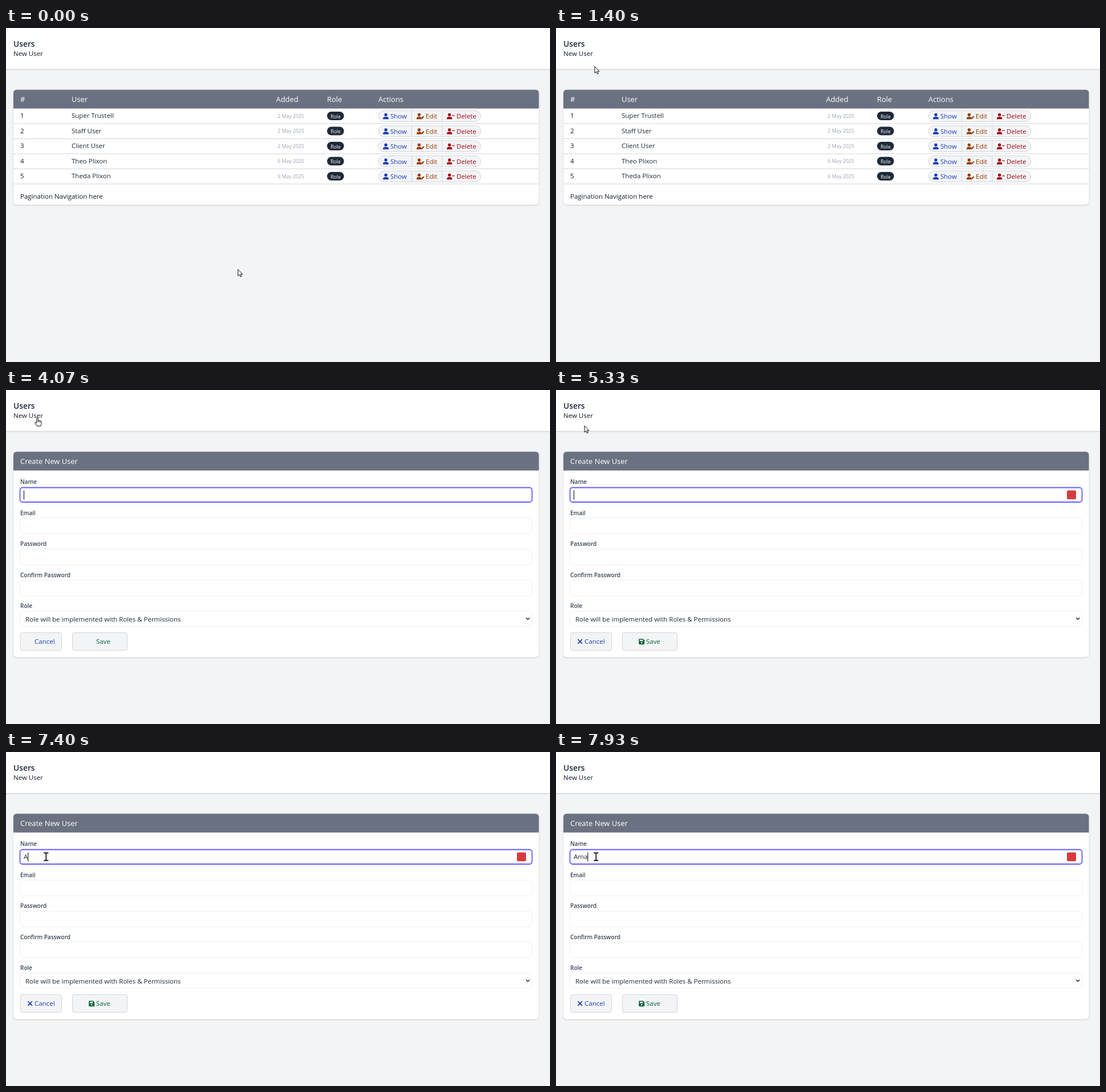
Animation, 954 px wide and 587 px high, one loop 8 s. Source, as an HTML page:

```html
<!DOCTYPE html>
<html lang="en">
<head>
<meta charset="utf-8">
<title>Users</title>
<style>
  html, body { margin: 0; width: 100%; height: 100%; overflow: hidden; background: #f3f4f6; }
  svg { display: block; width: 954px; height: 587px; }
  text { font-family: "Open Sans", "Noto Sans", sans-serif; white-space: pre; }
  .shadow { filter: drop-shadow(0 1px 1.5px rgba(0,0,0,.16)); }
  .field { filter: drop-shadow(0 .8px .8px rgba(0,0,0,.13)); }
  .float { filter: drop-shadow(0 1px 3px rgba(0,0,0,.3)); }
</style>
</head>
<body>
<svg id="stage" viewBox="0 0 954 587" xmlns="http://www.w3.org/2000/svg"></svg>
<script>
const LOOP = 8000, STEP = 1000 / 15;
const INK = '#1e2939', GREY = '#6a7282', LINE = '#d1d5dc', PALE = '#f3f4f6';
const BLUE = '#193cb8', AMBER = '#973c00', RED = '#9f0712', GREEN = '#016630';
const BODY = 11.5, HEAD = 12.9, SMALL = 8.7;

const text = (x, y, str, size = BODY, fill = INK, weight = 400, extra = '') =>
  `<text x="${x}" y="${y}" font-size="${size}" fill="${fill}" font-weight="${weight}" ${extra}>${str}</text>`;
const rect = (x, y, w, h, fill, extra = '') =>
  `<rect x="${x}" y="${y}" width="${w}" height="${h}" fill="${fill}" ${extra}/>`;
const path = (d, fill, extra = '') => `<path d="${d}" fill="${fill}" ${extra}/>`;
const group = (x, y, inner) => `<g transform="translate(${x} ${y})">${inner}</g>`;
const layer = (id, inner) => `<g id="${id}">${inner}</g>`;

const person = (x, y, fill, w = 10.2) => group(x, y,
  `<circle cx="${w / 2}" cy="2.7" r="2.7" fill="${fill}"/>` +
  path(`M0 10.6Q0 6.4 ${w * .4} 6.4H${w * .6}Q${w} 6.4 ${w} 10.6Z`, fill));

function card(height, title) {
  return rect(13, 108.5, 921.5, height, '#fff', 'rx="6" class="shadow"') +
    path('M13 141.5V114.5Q13 108.5 19 108.5H928.5Q934.5 108.5 934.5 114.5V141.5Z', GREY) + title;
}

function userRow([name, date], i) {
  const y = 141.5 + i * 26.5;
  const pen = path('M0 5.2L.5 3.2 4 -.3 5.7 1.4 2.2 4.8Z', AMBER);
  return text(25, y + 16.7, i + 1, BODY, '#101828') +
    text(115, y + 16.7, name) +
    text(476.5, y + 16, date, SMALL, '#99a1af') +
    rect(563, y + 5.5, 29.7, 15, INK, 'rx="7.5"') +
    text(578, y + 17, 'Role', SMALL, '#fff', 400, 'text-anchor="middle"') +
    rect(653.5, y + 3.5, 179, 19.5, PALE, `rx="9.75" stroke="${LINE}"`) +
    rect(711, y + 3.5, 1, 19.5, LINE) + rect(764.5, y + 3.5, 1, 19.5, LINE) +
    person(661, y + 8.2, BLUE) + text(674, y + 17.7, 'Show', BODY, BLUE) +
    person(720, y + 8.2, AMBER, 9) + group(728, y + 13.2, pen) +
    text(736, y + 17.7, 'Edit', BODY, AMBER) +
    person(773, y + 8.2, RED, 9.5) + rect(782.5, y + 11.7, 4.5, 1.4, RED, 'rx=".6"') +
    text(790, y + 17.7, 'Delete', BODY, RED) +
    rect(13, y + 26, 921.5, 1, LINE);
}

function userList() {
  const columns = { '#': 25, User: 115, Added: 473.5, Role: 563, Actions: 653 };
  const users = [
    ['Super Trustell', '2 May 2025'], ['Staff User', '2 May 2025'], ['Client User', '2 May 2025'],
    ['Theo Plixon', '6 May 2025'], ['Theda Plixon', '6 May 2025'],
  ];
  const heads = Object.entries(columns).map(([label, x]) => text(x, 130, label, HEAD, '#fff'));
  return card(202, heads.join('')) + users.map(userRow).join('') +
    text(25, 300, 'Pagination Navigation here', BODY, '#101828');
}

function userForm() {
  const labels = ['Name', 'Email', 'Password', 'Confirm Password', 'Role'];
  const fields = labels.map((label, i) => {
    const y = 54.5 * i;
    return text(25, 165 + y, label, 10, '#364153', 600) +
      (i ? rect(25, 171.5 + y, 897, i < 4 ? 26 : 24.5, '#fff', 'rx="4" class="field"') : '');
  });
  const button = (x, w) => rect(x, 426.5, w, 31, PALE, `rx="3" stroke="${LINE}"`);
  const icons =
    path('M38.8 438.5L45.6 445.3M45.6 438.5L38.8 445.3', 'none',
      `stroke="${BLUE}" stroke-width="1.7" stroke-linecap="round"`) +
    path('M146.7 437.2H152.7L155.2 439.7V445.8Q155.2 447.2 153.8 447.2H146.7Q145.3 447.2 145.3 445.8V438.6Q145.3 437.2 146.7 437.2Z' +
      'M147 438.7V441.4H152.4V438.7ZM150.2 442.9A1.35 1.35 0 1 0 150.2 445.6A1.35 1.35 0 1 0 150.2 442.9Z',
      GREEN, 'fill-rule="evenodd"') +
    rect(896, 176.5, 16, 15.5, '#d83b3d', 'rx="2"');
  return card(361, text(25, 130, 'Create New User', HEAD, '#fff')) + fields.join('') +
    rect(24.5, 171.5, 898, 25.5, '#fff', 'rx="4.5" stroke="#615fff" stroke-width="1.8"') +
    text(34, 406.8, 'Role will be implemented with Roles &amp; Permissions') +
    path('M912.2 400.2L915.2 403.2 918.2 400.2', 'none', `stroke="${INK}" stroke-width="1.6"`) +
    button(25.5, 72) + text(50, 446, 'Cancel', BODY, BLUE) +
    button(116.5, 96) + text(158, 446, 'Save', BODY, GREEN) +
    layer('icons', icons) +
    text(31, 188.3, '', BODY, INK, 400, 'id="typed"') +
    rect(31, 176.5, 1, 16, '#000', 'id="caret"');
}

function vaultPanel() {
  const entries = ['Lot 9', '82c Q', 'Lot 9'];
  const pencil = path('M-5.6 6L-4.6 2.2 2.2 -4.6 5 -1.8 -1.8 5ZM3 -5.3L4.2 -6.2Q5.3 -6.4 6.2 -5.2Q6.6 -4.4 5.7 -2.6Z', '#1d76e2') +
    path('M-3.2 3.4L2.6 -2.4', 'none', 'stroke="#fff" stroke-width=".8"');
  const rows = entries.map((place, i) => {
    const y = 209 + i * 48.5;
    return rect(35.5, y + .5, 31, 31, '#e7f6ef', 'rx="3" stroke="#d5eee2"') +
      text(51, y + 21.7, 'AT', 14.5, '#178a62', 600, 'text-anchor="middle"') +
      text(74, y + 10.5, 'Alwin', 11.2, '#8a8f98') + text(74, y + 29, place, 11.5, '#222') +
      group(881, y + 15.5, pencil);
  });
  return rect(25.5, 197.5, 898, 159.5, '#fafbfc', 'rx="2" class="float"') +
    rect(700, 198, 211, 126, 'url(#blush)') +
    `<g clip-path="url(#rows)">${rows.join('')}</g>` +
    rect(911, 198, 11.5, 126, '#fcfcfc') + rect(911.5, 209.5, 10, 65, '#c1c1c1') +
    path('M913.5 206L916.3 202.5 919 206Z', '#8b8b8b') + path('M913.5 315.8L916.3 319.2 919 315.8Z', '#505050') +
    rect(25.5, 324, 898, 1, '#d9dce0') + text(41, 345, 'More options', 9.8, '#222');
}

function suggestions() {
  const items = ['Alwin Torvey', 'Admin', 'Arlo - 2031 T4 - KLM - Thurs (D)', 'Avi T', 'Ann Caretaker', 'Azure 3x1 Plank'];
  return `<g class="float">${rect(100, 203, 178, 170, '#fff', 'rx="4"')}${path('M110 203.5L116.5 197.8 123 203.5Z', '#fff')}</g>` +
    items.map((item, i) => text(109, 223.5 + i * 27.3, item, 9.5, '#1b1b1b', 600)).join('');
}

const outline = 'stroke="#000" stroke-width=".95" stroke-linejoin="round"';
const pointers = {
  arrow: path('M0 0V11.4L2.6 9 4.4 13 6.2 12.2 4.5 8.3H8Z', '#fff', outline),
  hand: path('M-1.2 .8Q0 -1.1 1.2 .8V4.6Q2.4 4 3.2 5Q4.4 4.5 5.1 5.6Q6.9 5.3 7 7.4V10.5L5.7 14.4H-.5L-3.8 9.6Q-4.4 7.9 -2.9 7.8L-1.2 9.2Z' +
    'M1.2 5V7.4M3.2 5.2V7.5M5.1 5.8V7.7', '#fff', outline),
  beam: path('M-4 -6.6H-1L0 -6 1 -6.6H4M-4 6.6H-1L0 6 1 6.6H4M0 -6V6', 'none', 'stroke="#000" stroke-width="1.6"'),
};

document.getElementById('stage').innerHTML =
  `<defs><radialGradient id="blush" gradientUnits="userSpaceOnUse" cx="890" cy="205" r="180">
    <stop offset="0" stop-color="#fde5e4"/><stop offset=".5" stop-color="#fdeeee" stop-opacity=".8"/>
    <stop offset="1" stop-color="#fafbfc" stop-opacity="0"/></radialGradient>
  <clipPath id="rows">${rect(26, 198, 885, 126, '#000')}</clipPath></defs>` +
  rect(0, 0, 954, 587, PALE) + rect(-5, -5, 964, 77, '#fff', 'class="shadow"') +
  text(13, 33, 'Users', 13.8, INK, 600) + text(13, 49, 'New User', BODY, '#101828') +
  layer('list', userList()) + layer('form', userForm()) +
  layer('vault', vaultPanel()) + layer('suggest', suggestions()) +
  layer('tip', rect(77.5, 194.5, 98, 18, '#fff', 'stroke="#3c3c3c"') +
    text(83, 207, 'Please fill in this field.', 8.65, '#333')) +
  Object.entries(pointers).map(([id, shape]) => layer(id, shape)).join('');

const el = id => document.getElementById(id);
const show = (id, on) => el(id).setAttribute('visibility', on ? 'visible' : 'hidden');

// Pointer hot spot: [ms, x, y]
const route = [
  [0, 406.8, 424.3], [200, 358.5, 420.5], [467, 358.5, 420.5], [600, 430, 395], [733, 515, 330],
  [867, 440, 250], [1000, 250, 190], [1133, 80, 150], [1200, 28.5, 125], [1333, 91, 80],
  [1400, 68, 67.8], [1667, 60, 57], [1933, 54.2, 50], [3067, 54.2, 50], [3133, 55, 49],
  [5267, 55, 49], [5333, 50, 62.8], [5467, 52, 90], [5667, 61, 165], [5800, 66, 193],
  [5933, 66, 193], [6200, 70.3, 184], [LOOP, 70.3, 184],
];

function pointerAt(t) {
  const i = Math.max(1, route.findIndex(([time]) => time >= t));
  const [t0, x0, y0] = route[i - 1], [t1, x1, y1] = route[i];
  const k = Math.min(1, (t - t0) / (t1 - t0));
  return [x0 + (x1 - x0) * k, y0 + (y1 - y0) * k];
}

function render(ms) {
  const t = Math.floor(ms / STEP + .06) * STEP;
  const between = (a, b) => t > a - 10 && t < b - 10;
  const form = between(4067, LOOP + 99);

  show('list', !form);
  show('form', form);
  show('icons', between(4400, LOOP + 99));
  show('tip', between(6667, 7133));
  show('vault', between(7467, 7667));
  show('suggest', between(7467, 7800));

  const letters = between(7400, 7600) ? 1 : between(7600, 7867) ? 2 : between(7867, LOOP + 99) ? 3 : 0;
  el('typed').textContent = 'Ama'.slice(0, letters);
  el('caret').setAttribute('x', 31 + (letters && el('typed').getComputedTextLength()));
  const blinkOff = between(4600, 5133) || between(5667, 6200) || between(6733, 7200);
  show('caret', form && !blinkOff);

  const [x, y] = pointerAt(t);
  const kind = t > 5700 ? 'beam' : t > 1600 && y < 54 ? 'hand' : 'arrow';
  for (const id in pointers) show(id, id === kind);
  el(kind).setAttribute('transform', `translate(${x} ${y})`);
}

const start = performance.now();
function tick() {
  render((performance.now() - start) % LOOP);
  requestAnimationFrame(tick);
}
tick();
</script>
</body>
</html>
```
